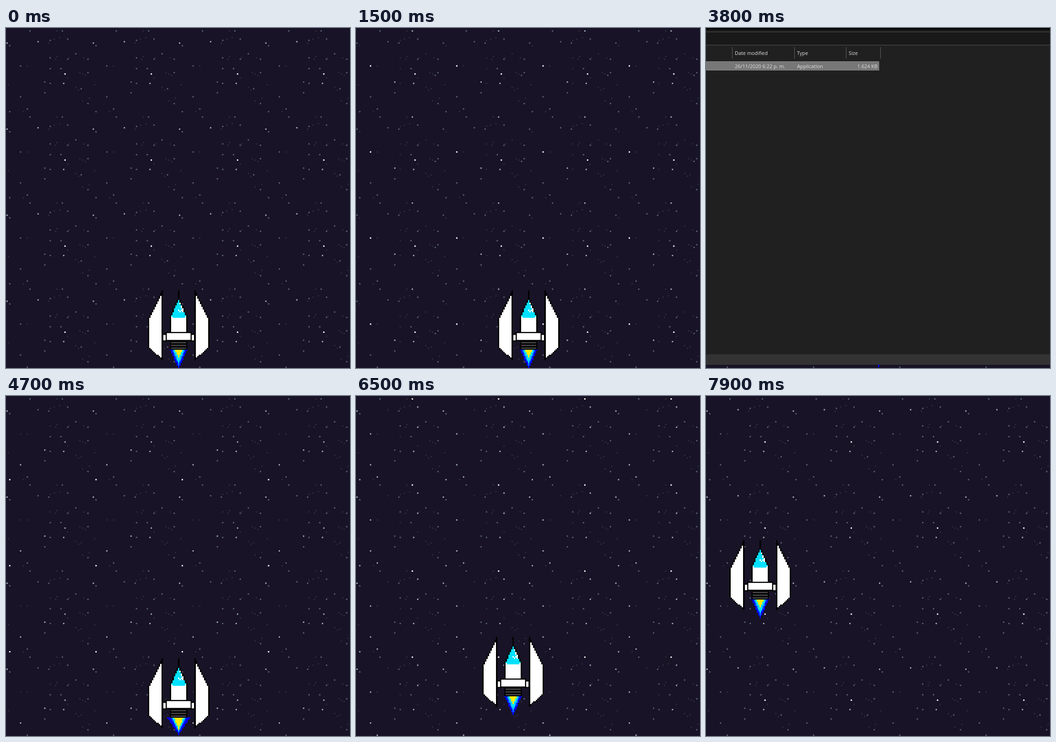
Recreate the animation shown at these times as an HTML page with a canvas. Size 752 by 745 pixels, loop 8000 ms.

```html
<!DOCTYPE html>
<html lang="en">
<head>
<meta charset="utf-8">
<title>Space ship</title>
<style>
  html, body { margin: 0; width: 100%; height: 100%; overflow: hidden; background: #181326; }
  canvas, svg { position: absolute; left: 0; top: 0; width: 752px; height: 745px; display: block; }
  text { font: 10.85px "Open Sans", "Noto Sans", sans-serif; fill: #e2e2e2; }
</style>
</head>
<body>
<canvas id="space" width="752" height="745"></canvas>
<svg id="files" viewBox="0 0 752 745" visibility="hidden">
  <rect width="752" height="738" fill="#202020"/>
  <rect width="752" height="37" fill="#191919"/>
  <rect width="752" height="3" fill="#000"/>
  <path d="M0 8.5H752M0 37.5H752" stroke="#535353"/>
  <path d="M57.5 42V67M193.5 42V67M306.5 42V67M381.5 42V67" stroke="#636363"/>
  <rect x="-1" y="73.5" width="379" height="19" fill="#777" stroke="#8b8b8b"/>
  <rect y="715" width="752" height="23" fill="#333"/>
  <text x="63" y="59">Date modified</text>
  <text x="199" y="59">Type</text>
  <text x="312" y="59">Size</text>
  <text x="63" y="87.5">26/11/2020 6:22 p. m.</text>
  <text x="199" y="87.5">Application</text>
  <text x="375" y="87.5" text-anchor="end">1.624 KB</text>
</svg>
<script>
const ctx = document.getElementById('space').getContext('2d');
const files = document.getElementById('files');
const LOOP = 8000, TICK = 100;
const UNIT = 2.9466, TILE = 64, CELL = 3;

// Ticks on which the picture rests
const RESTS = [1, 4, 8, 14, 22, 25, 42, 52, 75];
const SKY_ORDER = 'ACBDCBDAD';
const FLAME_ORDER = 'nwnnwwnnw';
const FILES_OPEN = [1800, 4500];

// Ship moves: start, end, dx, dy in background units
const MOVES = [
  [5750, 5900, 0, -16],
  [6400, 6950, -64, 0],
  [7100, 7300, -24, -24],
  [7500, 7900, 0, -48]
];

// Stars on one tile: column, row, brightness in the sky states A to D
const LEVELS = ['#181326', '#2d2b3c', '#566071', '#9caab6', '#ffffff'];
const TWINKLE = [
  [41, 2, '2324'], [0, 11, '3233'], [2, 13, '2122'], [23, 10, '3221'],
  [45, 8, '2223'], [32, 9, '2111'], [31, 11, '1222'], [51, 19, '2122'],
  [45, 23, '2223'], [32, 22, '2112'], [10, 28, '2413'], [32, 30, '2121'],
  [43, 34, '4430'], [28, 40, '2332'], [32, 41, '2122'], [55, 45, '2111'],
  [10, 51, '2233'], [2, 62, '2243'], [15, 60, '2223'], [58, 35, '1211']
];
const STEADY = {
  1: [[37, 2], [35, 8], [39, 7], [57, 22], [46, 22], [37, 21], [36, 23], [15, 28], [56, 34],
      [54, 33], [45, 37], [1, 42], [51, 44], [53, 46], [56, 54], [61, 52], [12, 62]],
  2: [[17, 2], [60, 23], [40, 30], [60, 33], [28, 48], [60, 56]],
  3: [[42, 41]]
};

function makeSky(state) {
  const sky = document.createElement('canvas');
  sky.width = 752;
  sky.height = 745;
  const g = sky.getContext('2d');
  g.fillStyle = LEVELS[0];
  g.fillRect(0, 0, 752, 745);
  const star = (x, y, level) => {
    g.fillStyle = LEVELS[level];
    for (let i = 0; i < 4; i++)
      for (let j = 0; j < 4; j++)
        g.fillRect((x + i * TILE) * UNIT + 0.9, (y + j * TILE) * UNIT - 0.9, UNIT, UNIT);
  };
  for (const level in STEADY) STEADY[level].forEach(([x, y]) => star(x, y, level));
  TWINKLE.forEach(([x, y, levels]) => star(x, y, levels[state]));
  return sky;
}
const skies = Object.fromEntries([...'ABCD'].map((name, i) => [name, makeSky(i)]));

// Ship cells: column 0 is the axis, row 0 the tip of the aerial
function cells(g, color, col, row, w = 1, h = 1) {
  g.fillStyle = color;
  g.fillRect((col + 30) * CELL, row * CELL, w * CELL, h * CELL);
}

function wing(g, side) {
  for (let k = 0; k <= 10; k++) {
    const col = side * (12 + k), top = 2 * k, end = 50 - Math.round(0.85 * k);
    cells(g, '#000', col, top, 1, end - top + 1);
    if (k > 0 && k < 10) cells(g, '#fff', col, top + 2, 1, end - top - 2);
  }
}

function cabin(g) {
  cells(g, '#000', 0, 0, 1, 8);
  const starts = [7, 9, 11, 13, 16, 18];
  for (let row = 7; row < 31; row++) {
    const half = starts.filter(s => s <= row).length;
    cells(g, '#000', -half, row, 2 * half + 1);
    for (let c = 1 - half; c < half; c++) {
      const shine = row >= 9 && row < 16 && c >= 1 + (row - 9) / 3;
      const glass = row < 19 || (row === 19 && Math.abs(c) < 5);
      cells(g, glass && !shine ? '#00e1ff' : '#fff', c, row);
    }
  }
  [[0, 14], [1, 15], [2, 14]].forEach(([c, r]) => cells(g, '#fff', c, r));
}

function box(g, x, y, w, h) {
  g.fillStyle = '#000';
  g.fillRect(x, y, w, h);
  g.fillStyle = '#fff';
  g.fillRect(x + 2.5, y + 2.5, w - 5, h - 5);
}

function engine(g) {
  box(g, 55.5, 95, 10, 17);
  box(g, 117.5, 95, 10, 17);
  box(g, 63, 91, 57, 20);
  g.fillStyle = '#000';
  g.fillRect(72.5, 111, 38, 19);
  g.fillStyle = '#414141';
  for (let i = 0; i < 3; i++) g.fillRect(75, 113 + i * 6, 33, 3);
}

// Layers: colour, half width at the top, length in rows
const FLAMES = {
  n: [['#0000ff', 6, 14], ['#0078ff', 4.6, 11.5], ['#00e1ff', 3.8, 10], ['#ffeb00', 2.7, 6]],
  w: [['#0000ff', 8, 12.5], ['#0078ff', 5.2, 11], ['#00e1ff', 4.5, 10], ['#ffeb00', 3.3, 8.5]]
};

function flame(g, kind) {
  for (const [color, half, rows] of FLAMES[kind])
    for (let r = 0; r < rows; r++) {
      const n = Math.floor(half * (1 - r / rows));
      cells(g, color, -n, 43 + r, 2 * n + 1);
    }
}

function makeShip(kind) {
  const ship = document.createElement('canvas');
  ship.width = 183;
  ship.height = 174;
  const g = ship.getContext('2d');
  wing(g, -1);
  wing(g, 1);
  cabin(g);
  flame(g, kind);
  engine(g);
  return ship;
}
const ships = { n: makeShip('n'), w: makeShip('w') };

function shipAt(t) {
  let x = 0, y = 0;
  for (const [from, to, dx, dy] of MOVES) {
    const p = Math.min(1, Math.max(0, (t - from) / (to - from)));
    x += dx * p;
    y += dy * p;
  }
  return [Math.round(x * UNIT), Math.round(y * UNIT)];
}

let shown = -1;
function draw(now) {
  const tick = Math.floor(now % LOOP / TICK);
  if (tick !== shown) {
    shown = tick;
    const t = tick * TICK;
    const step = (tick - RESTS.filter(r => r <= tick).length) % SKY_ORDER.length;
    const [x, y] = shipAt(t);
    ctx.drawImage(skies[SKY_ORDER[step]], 0, 0);
    ctx.drawImage(ships[FLAME_ORDER[step]], 286 + x, 575 + y);
    const open = t >= FILES_OPEN[0] && t < FILES_OPEN[1];
    files.setAttribute('visibility', open ? 'visible' : 'hidden');
  }
}

const start = performance.now();
function frame() {
  draw(performance.now() - start);
  requestAnimationFrame(frame);
}
frame();
</script>
</body>
</html>
```
